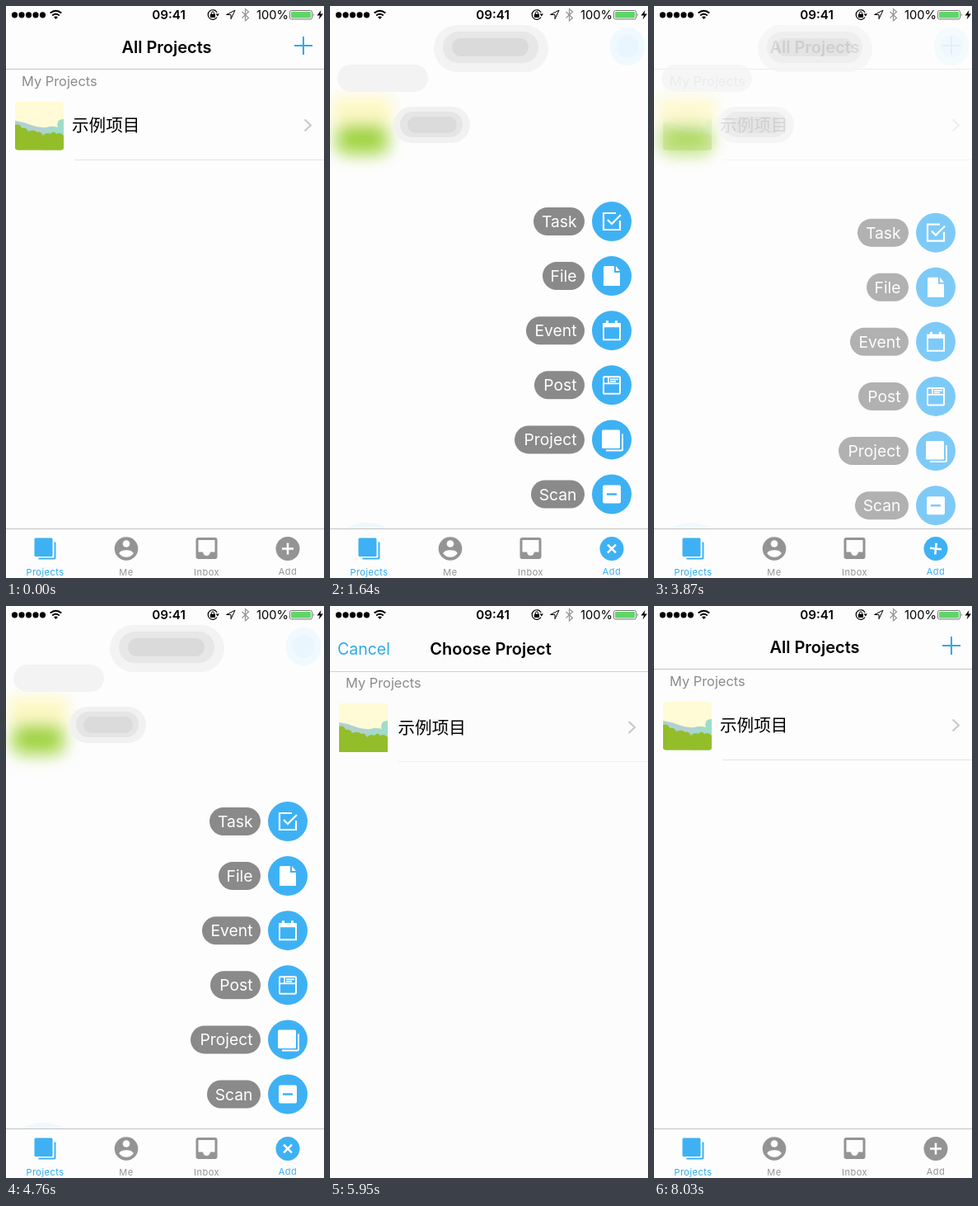
An HTML page that plays this animation: 386 by 693 pixels, repeating every 8270 ms.

```html
<!DOCTYPE html>
<html lang="en">
<head>
<meta charset="utf-8">
<title>Add menu</title>
<style>
  html, body { margin: 0; width: 100%; height: 100%; overflow: hidden; background: #fdfdfd; }
  svg { display: block; width: 100vw; height: 100vh; }
  text { font-family: Inter, Roboto, sans-serif; }
  .bold { font-weight: 600; font-size: 20px; text-anchor: middle; }
  .section { font-size: 16.4px; fill: #8b8b8b; }
  .cjk { font: 20.6px "Noto Sans CJK SC", "Noto Sans CJK", sans-serif; }
  .tab { font-size: 11px; letter-spacing: .5px; text-anchor: middle; }
  .label { font-size: 19.3px; fill: #fff; text-anchor: end; }
  .line { fill: none; stroke: currentColor; }
</style>
</head>
<body>
<svg id="stage" viewBox="0 0 386 693">
  <defs>
    <filter id="soft" x="-60%" y="-60%" width="220%" height="220%"><feGaussianBlur stdDeviation="9"/></filter>
    <clipPath id="rounded"><rect width="59" height="58.5" rx="3.5"/></clipPath>
    <clipPath id="square"><rect width="59" height="59"/></clipPath>
    <g id="scenery">
      <rect width="59" height="59" fill="#fefbd6"/>
      <path d="M0 23Q10 24 19 28T38 31Q44 29 51 31L59 28V59H0Z" fill="#b1d0d1"/>
      <path d="M34 40Q36 31 43 33Q50 28 52 32Q49 21 59 21V59H34Z" fill="#9fdcc9"/>
      <path d="M0 28Q6 26 8 32Q14 31 16 36Q23 33 27 37Q31 35 34 41Q38 36 43 39Q47 34 50 39Q55 36 59 41V59H0Z" fill="#94bd2a"/>
    </g>
    <g id="stack">
      <rect x="-13" y="-13" width="22" height="22.5" rx="1.5" fill="currentColor"/>
      <path class="line" d="M12-8V10.5Q12 12 10.500 12H-8" stroke-width="2"/>
    </g>
    <path id="chevron" class="line" d="M362.500 137.500L370 144.500L362.500 151.500" stroke-width="2" color="#c7c7cb"/>
  </defs>

  <rect width="386" height="693" fill="#fdfdfd"/>
  <g id="home">
    <text class="bold" x="195" y="56.500">All Projects</text>
    <path class="line" d="M350 48H372M361 37V59" stroke-width="2" color="#2eabea"/>
    <path class="line" d="M0 76.500H386" color="#c5c5c5"/>
    <text class="section" x="19" y="96.500">My Projects</text>
    <g transform="translate(11 116)" clip-path="url(#rounded)"><use href="#scenery"/></g>
    <text class="cjk" x="80" y="152">示例项目</text>
    <use href="#chevron"/>
    <path class="line" d="M83 186.500H386" color="#e4e4e4"/>
  </g>

  <g id="blur"></g>
  <g id="menu"></g>

  <g id="tabs">
    <rect y="634" width="386" height="59" fill="#fdfdfd"/>
    <path class="line" d="M0 633.500H386" color="#c3c3c3"/>
    <g color="#3eb1f4">
      <use href="#stack" transform="translate(47.500 657.500)"/>
      <text class="tab" x="47.500" y="689.500" fill="#2eabea">Projects</text>
    </g>
    <g fill="#949494">
      <circle cx="146" cy="657.500" r="14.300"/>
      <g fill="#fdfdfd">
        <circle cx="146" cy="651.500" r="4.300"/>
        <path d="M137.400 663.500C137.400 657.700 154.600 657.700 154.600 663.500Q151.500 667.700 146 667.700T137.400 663.500Z"/>
      </g>
      <rect x="230.500" y="644" width="26" height="26" rx="3"/>
      <path d="M233.500 647H253.500V661.500H248Q247 666 243.500 666T239 661.500H233.500Z" fill="#fdfdfd"/>
      <text class="tab" x="146" y="689.500">Me</text>
      <text class="tab" x="243.500" y="689.500">Inbox</text>
    </g>
    <g id="add">
      <circle cx="342" cy="657.500" r="14.500"/>
      <path id="cross" class="line" d="M335 657.500H349M342 650.500V664.500" stroke-width="2.500" color="#fff"/>
      <text class="tab" x="342" y="688.500">Add</text>
    </g>
  </g>

  <g id="modal">
    <rect width="386" height="693" fill="#fcfcfc"/>
    <text x="9" y="59" font-size="19.500" fill="#2eabea">Cancel</text>
    <text class="bold" x="195" y="59">Choose Project</text>
    <path class="line" d="M0 79.500H386" color="#d2d2d2"/>
    <text class="section" x="19" y="99">My Projects</text>
    <g transform="translate(11 118)" clip-path="url(#square)"><use href="#scenery"/></g>
    <text class="cjk" x="82.500" y="155">示例项目</text>
    <use href="#chevron" y="2.500"/>
    <path class="line" d="M83 188.500H386" color="#f0f0f0"/>
  </g>

  <g id="status">
    <g id="signal"></g>
    <g class="line" stroke-width="2">
      <path d="M53.700 8.600Q60.500 2.800 67.300 8.600M56.200 11.500Q60.500 8 64.800 11.500"/>
      <path d="M58 13.300Q60.500 11.500 63 13.300L60.500 16Z" fill="#000" stroke="none"/>
    </g>
    <text x="197.500" y="16" font-size="15.200" font-weight="600" text-anchor="middle">09:41</text>
    <path class="line" d="M256.200 8A5.800 5.800 0 1 0 256 13.500" stroke-width="1.200"/>
    <path d="M254.500 9.500H259L256.800 12.500ZM248 9.700H254V14H248Z"/>
    <path class="line" d="M249.400 10V8.500A1.600 1.600 0 0 1 252.600 8.500V10"/>
    <path class="line" d="M267.500 10.500L278 5.200L273 15.700V10.500Z" stroke-linejoin="round"/>
    <path class="line" d="M286.500 7L294.500 14.500L290.500 18V3.500L294.500 7L286.500 14.500" stroke-width="1.200" color="#949494"/>
    <text x="304" y="16" font-size="14.700">100%</text>
    <rect class="line" x="344.500" y="5.500" width="27" height="10.500" rx="2" color="#777"/>
    <rect x="346" y="7" width="24" height="7.500" rx="1" fill="#5fd568"/>
    <path d="M372.800 9Q375 10.700 372.800 12.500Z" fill="#777"/>
    <path d="M382.500 5L377.500 11.500H381L379.500 16.500L385 9.500H381.500Z"/>
  </g>
</svg>

<script>
const LOOP = 8270, TICK = 148.8;
const BLUE = "#3eb1f4", GREY = "#949494";
const $ = id => document.getElementById(id);

const pill = (x, y, w, h, fill) =>
  `<rect x="${x}" y="${y}" width="${w}" height="${h}" rx="${Math.min(w, h) / 2}" fill="${fill}"/>`;

$("signal").innerHTML = [0, 1, 2, 3, 4]
  .map(i => `<circle cx="${10.5 + i * 8.5}" cy="10.800" r="3.600"/>`).join("");

$("blur").innerHTML =
  `<g filter="url(#soft)">
    <rect x="3" y="110" width="72" height="40" fill="#fdf8c4"/>
    <rect x="5" y="142" width="68" height="40" rx="16" fill="#b9e06d"/>
    <ellipse cx="39" cy="160" rx="25" ry="12" fill="#9fd23c"/>
  </g>` +
  pill(126, 23, 139, 57, "#f3f3f3") + pill(137, 31, 116, 38, "#e7e7e7") + pill(148, 39, 93, 22, "#dadada") +
  pill(340, 26, 42, 46, "#f0f9fd") + pill(347, 35, 28, 28, "#eaf6fd") +
  pill(9, 71, 110, 33, "#f3f3f3") +
  pill(77, 122, 93, 44, "#f1f1f1") + pill(85, 128, 76, 31, "#e5e5e5") + pill(94, 134, 60, 20, "#dbdbdb") +
  `<ellipse cx="45" cy="645" rx="32" ry="19" fill="#eef8fd"/>`;

// Icons are white, drawn around the centre of their circle.
const items = [
  ["Task", 247, `<path class="line" d="M10-1V10H-10V-10H5M-5-2L0 3L11-8" stroke-width="2.200"/>`],
  ["File", 258, `<path d="M-8-12H3V-4H10V12H-10V-10Q-10-12-8-12ZM5-12L10-6H5Z" fill="#fff"/>`],
  ["Event", 238, `<path class="line" d="M-10-8H10V11H-10Z" stroke-width="2"/>
    <path d="M-11-9H11V-4H-11ZM-7-12H-4V-8H-7ZM4-12H7V-8H4Z" fill="#fff"/>`],
  ["Post", 248, `<rect class="line" x="-10" y="-10" width="20" height="20.500" rx="1" stroke-width="2"/>
    <path class="line" d="M-10-2H10M-2-7H8M-2-4.500H5M-4-10V-2" stroke-width="1.700"/>`],
  ["Project", 224, `<use href="#stack" x="1" y="1"/>`],
  ["Scan", 244, `<rect x="-11" y="-11" width="22" height="22" rx="2" fill="#fff"/>
    <path class="line" d="M-6 0H6" stroke-width="2.500" color="${BLUE}"/>`],
];

$("menu").innerHTML = items.map(([name, left, icon], i) =>
  `<g transform="translate(0 ${261 + i * 66.1})">
    ${pill(left, -17, 309 - left, 34, "#8a8a8a")}
    <text class="label" x="299.500" y="7">${name}</text>
    <g transform="translate(342 0)" color="#fff"><circle r="24" fill="${BLUE}"/>${icon}</g>
  </g>`).join("");

const clamp = x => Math.max(0, Math.min(1, x));
const ease = x => 1 - (1 - clamp(x)) ** 2;
const tween = (tick, start, length) => ease((tick - start) / length);

function render(time) {
  const tick = Math.floor((time % LOOP + 10) / TICK);
  const open = tween(tick, 4.6, 2.4) - tween(tick, 13.7, 1.8)
    + tween(tick, 24.8, 2.6) - tween(tick, 34.7, 1.8);
  const shown = tween(tick, 36.6, 3.4) - tween(tick, 46.7, 3.6);
  const visible = clamp((open - .15) / .85);

  $("home").setAttribute("opacity", 1 - open);
  $("blur").setAttribute("opacity", open);
  $("menu").setAttribute("opacity", visible);
  $("menu").setAttribute("transform", `translate(0 ${40 * (1 - visible)})`);
  $("cross").setAttribute("transform", `rotate(${135 * open} 342 657.5)`);
  $("add").setAttribute("fill", open > .5 ? BLUE : GREY);
  $("modal").setAttribute("transform", `translate(0 ${693 * (1 - shown)})`);
}

const start = performance.now();
function frame() {
  render(performance.now() - start);
  requestAnimationFrame(frame);
}
frame();
</script>
</body>
</html>
```
